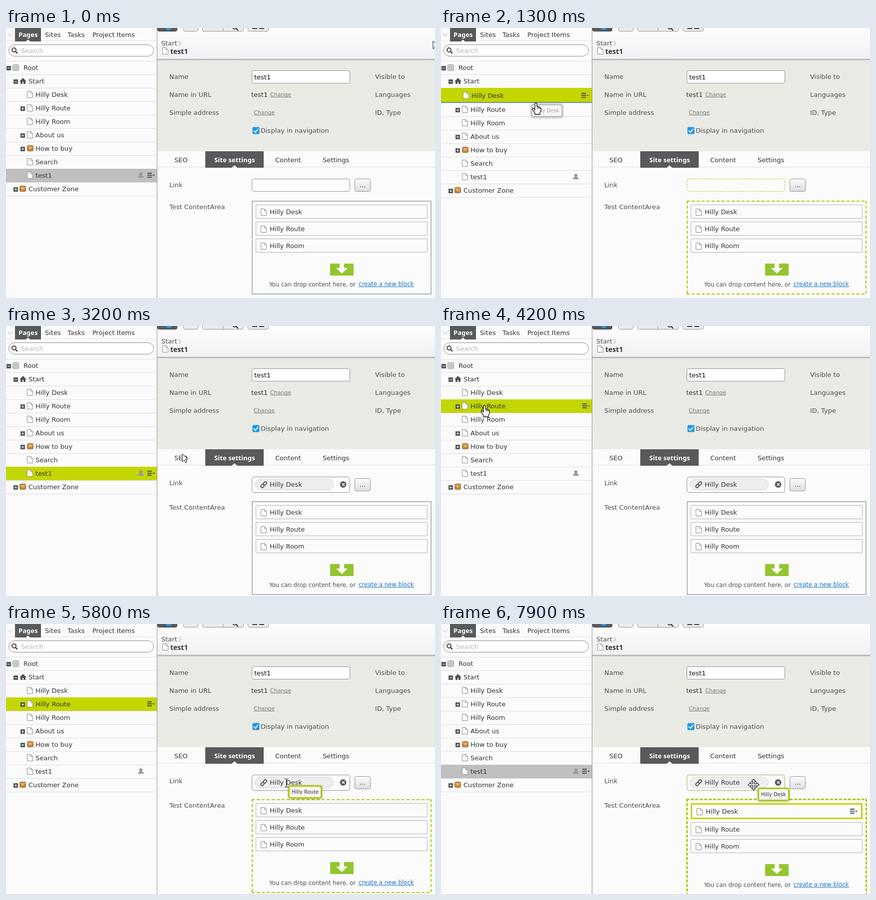
Recreate the animation shown at these times as an HTML page with a canvas. Size 859 by 541 pixels, loop 8 s.

```html
<!DOCTYPE html>
<html lang="en">
<head>
<meta charset="utf-8">
<title>Drag and drop</title>
<style>
html, body { margin: 0; width: 100%; height: 100%; overflow: hidden; background: #fbfbfb; }
canvas { display: block; }
</style>
</head>
<body>
<canvas id="stage" width="859" height="541"></canvas>
<script>
const g = document.getElementById('stage').getContext('2d');
const LOOP = 8000;
const DARK = '#58595b', LIME = '#c4d600', EDGE = '#aec800', INK = '#333', LABEL = '#4d4d4d';
const sans = px => px + 'px "DejaVu Sans", Verdana, sans-serif';
const bold = px => 'bold ' + px + 'px "Noto Sans", "Open Sans", sans-serif';
const ITEMS = ['Hilly Desk', 'Hilly Route', 'Hilly Room'];

// time, cursor x, cursor y, drag label offset x, y
const PATH = [
  [0, 855, 26, 5, 4], [200, 740, 38, 5, 4], [600, 230, 105, 5, 4], [900, 63, 131, 5, 4],
  [1000, 63, 131, 5, 4], [1100, 75, 137, -4, 2], [1300, 190, 150, -10, 2], [1500, 330, 198, 5, 4],
  [1800, 488, 289, 5, 3], [2200, 537, 311, 5, 3], [2400, 538, 315, 5, 3], [2500, 538, 315, 5, 3],
  [2600, 541, 318, 5, 3], [2900, 541, 318, 5, 3], [3300, 290, 235, 5, 4], [3700, 87, 159, 5, 4],
  [4200, 87, 159, 5, 4], [4400, 175, 180, -4, 4], [4600, 345, 230, 4, 5], [5000, 470, 278, 4, 5],
  [5500, 559, 314, 4, 5], [5700, 561, 318, 4, 5], [6700, 561, 318, 4, 5], [7200, 576, 373, 5, 4],
  [7400, 576, 373, 5, 4], [7600, 583, 358, 8, 6], [7900, 626, 322, 8, 6]
];

function pose(t) {
  let i = 0;
  while (i < PATH.length - 2 && PATH[i + 1][0] <= t) i++;
  const a = PATH[i], b = PATH[i + 1];
  const k = Math.min(1, (t - a[0]) / (b[0] - a[0]));
  return a.map((v, n) => Math.round(v + (b[n] - v) * k));
}

function rect(x, y, w, h, color) {
  g.fillStyle = color;
  g.fillRect(x, y, w, h);
}

function box(x, y, w, h, r, fill, stroke, line = 1) {
  const d = line / 2;
  g.beginPath();
  g.roundRect(x + d, y + d, w - line, h - line, r);
  if (fill) { g.fillStyle = fill; g.fill(); }
  if (stroke) { g.strokeStyle = stroke; g.lineWidth = line; g.stroke(); }
}

function text(s, x, mid, color = INK, font = sans(13), drop = 5) {
  g.font = font;
  g.fillStyle = color;
  g.fillText(s, x, mid + drop);
}

function link(s, x, mid, color, size) {
  text(s, x, mid, color, sans(size), 4);
  rect(x, mid + 5, Math.round(g.measureText(s).width), 1, color);
}

function shape(points, fill, stroke, line = 1) {
  g.beginPath();
  points.forEach(p => g.lineTo(p[0], p[1]));
  g.closePath();
  if (fill) { g.fillStyle = fill; g.fill(); }
  if (stroke) { g.strokeStyle = stroke; g.lineWidth = line; g.stroke(); }
}

function stroke(points, color, line = 1) {
  g.beginPath();
  points.forEach(p => g.lineTo(p[0], p[1]));
  g.strokeStyle = color;
  g.lineWidth = line;
  g.stroke();
}

function disc(x, y, r, color) {
  g.beginPath();
  g.arc(x, y, r, 0, 7);
  g.fillStyle = color;
  g.fill();
}

function fade(y0, y1, a, b) {
  const f = g.createLinearGradient(0, y0, 0, y1);
  f.addColorStop(0, a);
  f.addColorStop(1, b);
  return f;
}

function dashed(x, y, w, h, line) {
  const d = line / 2;
  g.save();
  g.setLineDash(line > 2 ? [6, 3] : [6, 4]);
  stroke([[x, y + d], [x + w, y + d]], EDGE, line);
  stroke([[x, y + h - d], [x + w, y + h - d]], EDGE, line);
  stroke([[x + d, y], [x + d, y + h]], EDGE, line);
  stroke([[x + w - d, y], [x + w - d, y + h]], EDGE, line);
  g.restore();
}

function page(x, mid) {
  const y = mid - 6.5;
  shape([[x + .5, y], [x + 7.5, y], [x + 11.5, y + 4], [x + 11.5, y + 13], [x + .5, y + 13]], '#fff', '#8b8b8b');
  stroke([[x + 7.5, y], [x + 7.5, y + 4], [x + 11.5, y + 4]], '#8b8b8b');
}

function crate(x, mid) {
  box(x, mid - 6, 13, 12, 2, '#c48a3f', '#96682c');
  rect(x + 1, mid - 3, 11, 1, '#f0d09a');
  rect(x + 4, mid - 1, 5, 2, '#eac78f');
}

function house(x, mid) {
  shape([[x, mid + 1], [x + 7, mid - 6], [x + 14, mid + 1]], '#505255');
  rect(x + 2, mid, 4, 6, '#505255');
  rect(x + 8, mid, 4, 6, '#505255');
  rect(x + 2, mid, 10, 2, '#505255');
}

function rack(x, mid) {
  box(x, mid - 6, 13, 13, 2, '#e6e6e6', '#858585');
  for (let i = 0; i < 3; i++) rect(x + 2, mid - 3 + i * 3, 9, 1, '#858585');
}

function toggle(x, mid, open) {
  rect(x, mid - 3, 9, 9, '#55585a');
  rect(x + 2, mid + 1, 5, 1, '#fff');
  if (!open) rect(x + 4, mid - 1, 1, 5, '#fff');
}

function menu(x, mid) {
  for (let i = -1; i < 2; i++) rect(x, mid + i * 4 - 1, 9, 2, '#4a4c4e');
  shape([[x + 10, mid - 1], [x + 15, mid - 1], [x + 12.5, mid + 2]], '#4a4c4e');
}

function person(x, mid) {
  disc(x, mid - 2.5, 3.3, '#999');
  shape([[x - 6, mid + 5], [x - 5, mid + 2], [x - 1, mid], [x + 1, mid], [x + 5, mid + 2], [x + 6, mid + 5]], '#999');
}

function lens(x, y, r, color) {
  g.beginPath();
  g.arc(x, y, r, 0, 7);
  g.strokeStyle = color;
  g.lineWidth = 2;
  g.stroke();
  stroke([[x + r * .7, y + r * .7], [x + r + 3, y + r + 3]], color, 2.4);
}

// label, level, icon, toggle state
const ROWS = [
  ['Root', 0, rack, 'open'], ['Start', 1, house, 'open'], [ITEMS[0], 2, page], [ITEMS[1], 2, page, 'shut'],
  [ITEMS[2], 2, page], ['About us', 2, page, 'shut'], ['How to buy', 2, crate, 'shut'],
  ['Search', 2, page], ['test1', 2, page], ['Customer Zone', 1, crate, 'shut']
];
const TOGGLE_X = [1, 15, 29], ICON_X = [13, 27, 42], TEXT_X = [35, 45, 59];

function tree(s) {
  rect(0, 0, 302, 541, '#fbfbfb');
  rect(0, 25, 302, 1, '#e3e3e3');
  stroke([[4, 11], [8.5, 16.5], [13, 11]], '#aaa');
  rect(18, 0, 52, 27, DARK);
  shape([[40, 27], [44, 23], [48, 27]], '#fbfbfb');
  text('Pages', 25, 13, '#fff', bold(13));
  text('Sites', 78, 13);
  text('Tasks', 123, 13);
  text('Project Items', 173, 13);
  box(5, 33, 291, 24, 12, '#fff', '#8c8c8c');
  lens(16, 44, 4, '#444');
  text('Search', 30, 45, '#b4b4b4');
  rect(0, 66, 302, 1, '#dedede');

  let top = 66;
  ROWS.forEach(([label, level, icon, state], i) => {
    const on = i === s.row, grow = on && s.dropLine ? 1 : 0;
    const mid = top + 13 + grow * 2, dx = grow * 2;
    const h = 27 + grow * 3;
    if (on) rect(0, top, 302, h, s.focus ? LIME : '#bfbfbf');
    rect(0, top + h, 302, 1, '#dedede');
    if (grow) rect(0, top + h - 2, 302, 2, '#74938f');
    if (state) toggle(TOGGLE_X[level], mid, state === 'open');
    icon(ICON_X[level] + dx, mid);
    text(label, TEXT_X[level] + dx, mid);
    if (i === 8) person(270, mid);
    if (on) menu(283 - dx, mid);
    top += h;
  });
  rect(302, 0, 1, 541, '#8f8f8f');
}

function button(x, w) {
  box(x, -20, w, 27, 3, '#ececec', '#8d9296');
}

function header() {
  rect(303, 0, 556, 62, fade(0, 62, '#fdfdfd', '#f1f1f3'));
  box(303, -20, 40, 27, 3, DARK, '#444');
  disc(326, -2, 6, '#1e9df0');
  button(355, 30);
  button(393, 83);
  rect(434, 0, 1, 7, '#8d9296');
  lens(458, -2, 4, '#444');
  button(484, 42);
  rect(493, 0, 10, 2, '#444');
  rect(507, 0, 10, 2, '#444');
  text('Start', 311, 30, LABEL);
  stroke([[346, 26], [350, 31], [346, 36]], '#888');
  page(313, 46);
  text('test1', 329, 47, INK, bold(14));
}

function form() {
  rect(303, 64, 556, 183, fade(64, 247, '#e9e9e5', '#ebebe5'));
  rect(303, 62, 556, 1, '#999');
  rect(303, 63, 556, 3, fade(63, 66, '#c4c4c2', '#e9e9e5'));
  ['Name', 'Name in URL', 'Simple address'].forEach((s, i) => text(s, 327, 97 + i * 36, LABEL));
  ['Visible to', 'Languages', 'ID, Type'].forEach((s, i) => text(s, 739, 97 + i * 36, LABEL));
  box(492, 85, 197, 26, 3, '#fff', '#8a939b');
  text('test1', 497, 98, '#111');
  text('test1', 491, 133);
  link('Change', 529, 133, '#777', 11);
  link('Change', 496, 169, '#777', 11);
  box(493, 198, 15, 15, 2, '#1e96ee');
  stroke([[496, 205.5], [499.5, 209], [505, 202]], '#fff', 2);
  text('Display in navigation', 510, 205, LABEL);

  rect(303, 247, 556, 294, '#fbfbfb');
  rect(303, 278, 556, 1, '#dedede');
  rect(399, 247, 117, 33, DARK);
  shape([[452, 280], [457.5, 275], [463, 280]], '#fbfbfb');
  text('SEO', 337, 264);
  text('Site settings', 417, 264, '#fff', bold(13.2));
  text('Content', 539, 264);
  text('Settings', 634, 264);
}

function chain(x, y) {
  g.save();
  g.translate(x, y);
  g.rotate(-Math.PI / 4);
  box(-8, -3.5, 9, 7, 3.5, null, '#4c4f52', 1.8);
  box(-1, -3.5, 9, 7, 3.5, null, '#4c4f52', 1.8);
  g.restore();
}

function linkField(s) {
  const h = s.link ? 32 : 26, mid = s.link ? 318 : 315;
  const loose = s.drag && !s.over;
  const edge = !s.drag ? '#8a939b' : loose ? EDGE : s.t < 2900 ? '#b4c81e' : s.t < 6300 ? '#87918f' : '#9fae5e';
  text('Link', 327, 314, LABEL);
  g.save();
  if (loose) g.setLineDash([3, 2]);
  box(492, 302, 197, h, 4, loose ? '#fbfbfb' : '#fdfdfd', edge);
  g.restore();
  if (s.link) {
    box(498, 306, 158, 23, 11, '#eeeeee', '#d5d5d5');
    chain(516, 318);
    text(s.link, 528, 317);
    disc(675, 317.5, 6.5, '#595c5f');
    stroke([[673, 315], [678, 320]], '#fff', 1.5);
    stroke([[678, 315], [673, 320]], '#fff', 1.5);
  }
  box(698, mid - 13, 32, 26, 3, fade(mid - 13, mid + 13, '#fbfbfb', '#dcdee0'), '#8a939b');
  text('...', 708, mid - 1);
}

function area(s) {
  const y = s.link ? 5 : 0, lifted = s.t >= 7500;
  text('Test ContentArea', 327, 358 + y, LABEL);
  if (lifted) dashed(491, 350, 362, 195, 3);
  else if (s.drag) dashed(492, 346 + y, 360, 188, 2);
  else box(492, 346 + y, 360, 188, 0, null, '#afb6bc', 2);

  ITEMS.forEach((name, i) => {
    const big = lifted && i === 0, push = lifted && i > 0 ? 4 : 0;
    const mid = 368 + y + i * 34 + push + (big ? 2 : 0), dx = big ? 2 : 0;
    if (big) box(500, 359, 344, 32, 0, '#fbfbfb', LIME, 3);
    else box(500, mid - 14, 344, 28, 0, '#fbfbfb', '#adb3b9');
    page(510 + dx, mid + 1);
    text(name, 528 + dx, mid);
    if (i === 0 && s.itemHover) menu(821 - dx, mid);
  });

  const low = y + (lifted ? 4 : 0);
  rect(649, 472 + low, 47, 24, '#93c52f');
  rect(668, 472 + low, 9, 9, '#fff');
  shape([[661, 481 + low], [684, 481 + low], [672.5, 492 + low]], '#fff');
  text('You can drop content here, or', 527, 513 + low, LABEL, sans(11.7));
  link('create a new block', 706, 513 + low, '#1b75c4', 11.7);
}

function dragLabel(s) {
  const x = s.x + s.dx, y = s.y + s.dy, live = s.over || s.t >= 7500;
  g.font = sans(10);
  const w = Math.round(g.measureText(s.drag).width) + 14;
  g.save();
  g.shadowColor = 'rgba(0,0,0,.35)';
  g.shadowBlur = 4;
  g.shadowOffsetY = 1;
  box(x, y, w, 27, 3, '#f6f6f6');
  g.restore();
  box(x, y, w, 27, 3, '#f6f6f6', live ? EDGE : '#c3c3c3', 3);
  text(s.drag, x + 7, y + 13, live ? INK : '#aaa', sans(10), 4);
}

const POINTERS = {
  arrow() {
    shape([[0, 0], [0, 16], [4, 12.5], [6.5, 18], [9, 17], [6.5, 11.5], [11, 11]], '#fff', '#111');
  },
  hand() {
    shape([[-2, 1.5], [-1, 0], [1, 0], [2, 1.5], [2, 7], [5, 7.5], [8, 9], [10, 10.5], [10, 16], [8, 20],
      [8, 23], [-2, 23], [-2, 20], [-7, 13], [-6, 10.5], [-4, 11], [-2, 13.5]], '#fff', '#111', 1.3);
    [3, 5.5, 8].forEach(x => stroke([[x, 8], [x, 12]], '#111'));
  },
  move() {
    const arm = [[-1.5, -1.5], [-1.5, -6], [-4.5, -6], [0, -11], [4.5, -6], [1.5, -6]], all = [];
    for (let i = 0; i < 4; i++) {
      const c = [1, 0, -1, 0][i], n = [0, 1, 0, -1][i];
      arm.forEach(([x, y]) => all.push([x * c - y * n, x * n + y * c]));
    }
    shape(all, '#fff', '#222', 1.2);
  },
  beam() {
    rect(0, -7, 1, 15, '#111');
    rect(-3, -8, 3, 1, '#111');
    rect(1, -8, 3, 1, '#111');
    rect(-3, 8, 3, 1, '#111');
    rect(1, 8, 3, 1, '#111');
  }
};

function pointerKind(s) {
  if (s.x < 302) return 'hand';
  if (s.t >= 5700 && s.t < 6900) return 'beam';
  if (s.drag) return 'move';
  if (s.itemHover) return 'hand';
  return s.over ? 'beam' : 'arrow';
}

function stateAt(t) {
  const [, x, y, dx, dy] = pose(t);
  const s = { t, x, y, dx, dy };
  s.drag = t >= 1100 && t < 2900 || t >= 7500 ? ITEMS[0] : t >= 4300 && t < 6300 ? ITEMS[1] : '';
  s.link = t < 2900 ? '' : t < 6300 ? ITEMS[0] : ITEMS[1];
  s.row = t >= 1000 && t < 2900 ? 2 : t >= 3800 && t < 6300 ? 3 : 8;
  s.focus = t >= 1000 && t < 7400;
  s.dropLine = t >= 1200 && t < 1400;
  s.over = x > 492 && x < 689 && y > 302 && y < (s.link ? 334 : 328);
  s.itemHover = t >= 7500 || x > 500 && y > 359;
  return s;
}

function draw(t) {
  const s = stateAt(t);
  tree(s);
  header();
  form();
  linkField(s);
  area(s);
  if (s.drag) dragLabel(s);
  g.save();
  g.translate(s.x, s.y);
  POINTERS[pointerKind(s)]();
  g.restore();
}

const start = performance.now();
function tick() {
  const t = (performance.now() - start) % LOOP;
  draw(Math.floor(t / 100) * 100);
  requestAnimationFrame(tick);
}
tick();
</script>
</body>
</html>
```
